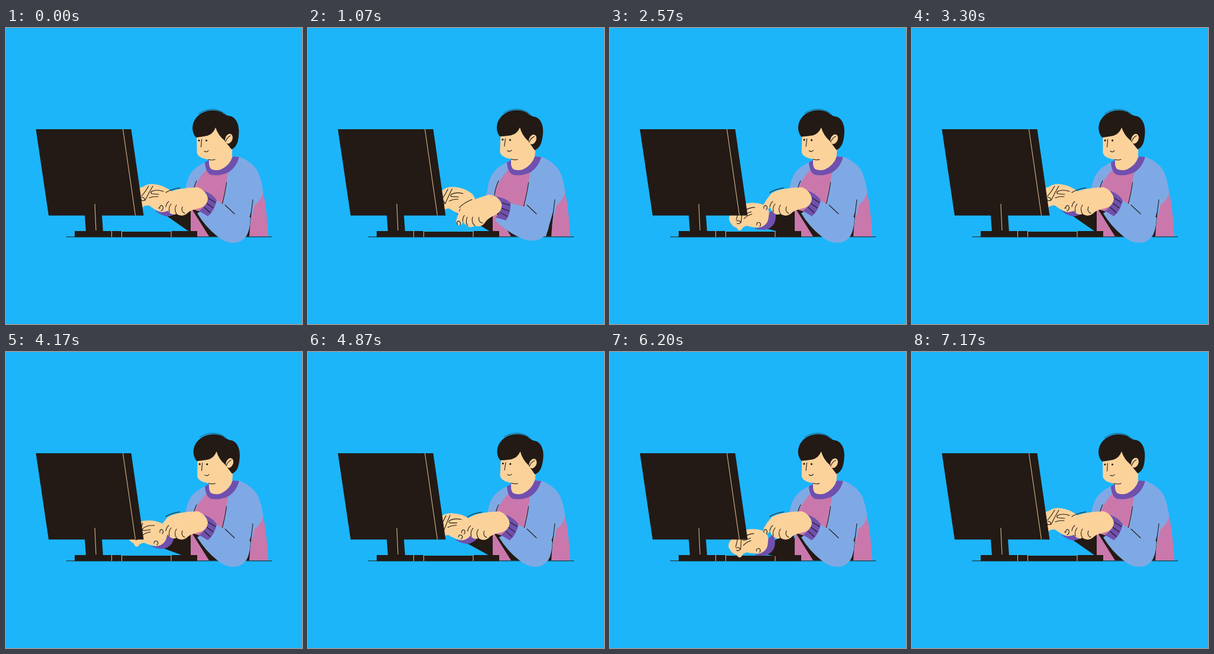
An HTML page for the animation above (7200 ms loop, 500 by 500 pixels).

```html
<!DOCTYPE html>
<html lang="en">
<head>
<meta charset="utf-8">
<title>Typing at the desk</title>
<style>
  html, body { margin: 0; width: 100%; height: 100%; overflow: hidden; background: #1cb5fa; }
  svg { display: block; width: 100%; height: 100%; }
  .ink { fill: #231a15; }
  .skin { fill: #fcd29b; }
  .sleeve { fill: #7fa9e5; }
  .shirt { fill: #ca78ac; }
  .trim { fill: #7050ae; }
  .line { fill: none; stroke: #231a15; stroke-width: 1.1; stroke-linecap: round; stroke-linejoin: round; }
  .cream { fill: none; stroke: #d9b98d; stroke-width: 1.1; }
</style>
</head>
<body>
<svg viewBox="0 0 500 500">
  <path class="line" d="M102 352.800H449" style="stroke-width:1"/>

  <g id="base">
    <path class="ink" d="M133 316H162L164 344H135ZM116 343H196V344H279V343H323V353.300H116Z"/>
    <path class="cream" d="M178.500 343V353M195.500 343V353M279 343V353"/>
  </g>

  <g id="farArm">
    <path class="ink" d="M284 301L268 315L308 343H323L326 303L300 301Z"/>
    <path class="trim" d="M296 290Q295 305 287 313Q279 319 270 318Q259 315 251 308Q262 313 270 308Q278 304 280 296Z"/>
    <path class="skin" d="M218 279Q220 271 232 268Q240 262 252 264Q268 266 281 277Q290 288 282 299Q276 312 262 311Q250 307 242 300Q234 299 231 303Q225 304 225 297Q217 291 218 279Z"/>
    <path class="line" d="M229 284Q236 276 241 267M235 291Q241 279 248 267M266 276Q254 272 246 276Q243 279 247 280L258 281M242 287Q249 284 257 285M229 286Q235 286 234 291Q231 293 228 290M258 305Q259 300 264 303Q266 307 262 309"/>
  </g>

  <g id="monitor">
    <path class="ink" d="M50.500 171H211.500L232.500 316.700H72Z"/>
    <path class="cream" d="M197.500 171L218.500 316.500M150 297L152 342"/>
  </g>

  <g id="torso">
    <path class="sleeve" d="M338 226Q319 234 311 247Q304 260 303 275L298 288V302H318L340 243Z"/>
    <path class="shirt" d="M337 241Q322 256 315 280L312 306V343H323V352H443Q441 312 435 280L415 235L390 225Z"/>
    <path class="sleeve" d="M393 217Q417 226 426 244Q432 258 434.500 278Q430 292 420 299Q414 320 410 352H396L372 330L366 298L372 262L376 240Z"/>
    <path class="ink" d="M314 306L343 352H358L334 312ZM414 310L411 352H402Z"/>
    <path class="line" d="M372.500 261Q370 280 364 302M322 258Q317 268 315 282M417 290L412 330"/>
    <path class="skin" d="M343 222L343 238L360 242L376 232L383 216Z"/>
  </g>

  <g id="head">
    <path class="skin" d="M322 178L322.500 211Q325 220 342 222L343 237Q358 242 374 233Q383 225 382 203L374 165H335Z"/>
    <path class="ink" d="M321 185C313 176 313 162 321 152C331 139 350 136 364 142Q371 148 380 149C391 153 395 168 393 182C392 195 388 202 381 205L369 190Q358 181 354 168Q350 179 340 182Q330 184 321 185Z"/>
    <ellipse class="skin" cx="376.500" cy="187" rx="6" ry="8.500" transform="rotate(22 376.500 187)"/>
    <path class="line" d="M371 192Q373 185 379 182M330.500 188L329.500 201M335 208Q339 211 342 207M342 222Q348 224 353 222"/>
    <path class="line" style="stroke-width:.6" d="M325 145Q338 136 352 137.500Q364 139 371 146"/>
    <g class="ink"><circle cx="326" cy="190" r="1.600"/><circle cx="338.500" cy="190" r="1.600"/></g>
  </g>

  <path class="trim" d="M336 227L343 223Q342 233 346 238Q353 242 363 239Q378 232 383 217L394 218Q389 235 377 243Q362 251 346 248Q337 244 336 227Z"/>

  <g id="nearArm">
    <path class="sleeve" d="M353 290L371 300L413 320Q412 345 404 354Q396 363 383 363Q368 362 356 351Q337 336 323 313L334 306Z"/>
    <path class="trim" d="M333 274Q350 281 356 291Q352 309 341 318L326 309Q338 301 339 289Q339 281 333 274Z"/>
    <path class="line" d="M341 287L354 295M339 296L350 304M335 303L345 312"/>
    <path class="skin" d="M324 269Q338 274 341 288Q340 302 324 305Q310 308 305 314Q297 320 288 314Q282 317 276 312Q272 308 270 302Q268 308 262 307Q257 304 260 297Q265 288 273 279Q288 270 324 269Z"/>
    <path class="line" d="M270 278Q279 272 294 270M270 302Q271 296 275 293M276 311Q274 303 279 297M288 314Q283 306 288 299M302 313Q295 310 298 302M260 305Q259 299 264 300Q267 304 264 307"/>
  </g>
  <path class="line" d="M370 299L386 314"/>
</svg>
<script>
  const LOOP = 3600, BEAT = 1200;
  const part = id => document.getElementById(id);
  const [head, farArm, nearArm] = ["head", "farArm", "nearArm"].map(part);

  const smooth = (from, to, t) => {
    const k = Math.min(1, Math.max(0, (t - from) / (to - from)));
    return k * k * (3 - 2 * k);
  };
  // Goes from 0 to 1, stays, and returns to 0.
  const press = (t, a, b, c, d) => smooth(a, b, t) - smooth(c, d, t);

  function pose(time) {
    const t = time % LOOP;
    const sway = press(t, 0, 1450, 1850, 3500);
    // The near hand skips the last of the three beats.
    const near = press(t, 830, 1010, 1090, 1290) + press(t - BEAT, 830, 1010, 1090, 1290);
    const far = press(t % BEAT, 0, 220, 420, 760) + 0.14 * near;

    head.setAttribute("transform", `rotate(${3.7 * sway} 355 242)`);
    farArm.setAttribute("transform", `rotate(${-25 * far} 325 345)`);
    nearArm.setAttribute("transform", `translate(${-3 * near} ${-6 * near}) rotate(${-14 * near} 392 340)`);
  }

  const start = performance.now();
  function tick() {
    pose(performance.now() - start);
    requestAnimationFrame(tick);
  }
  pose(0);
  tick();
</script>
</body>
</html>
```
